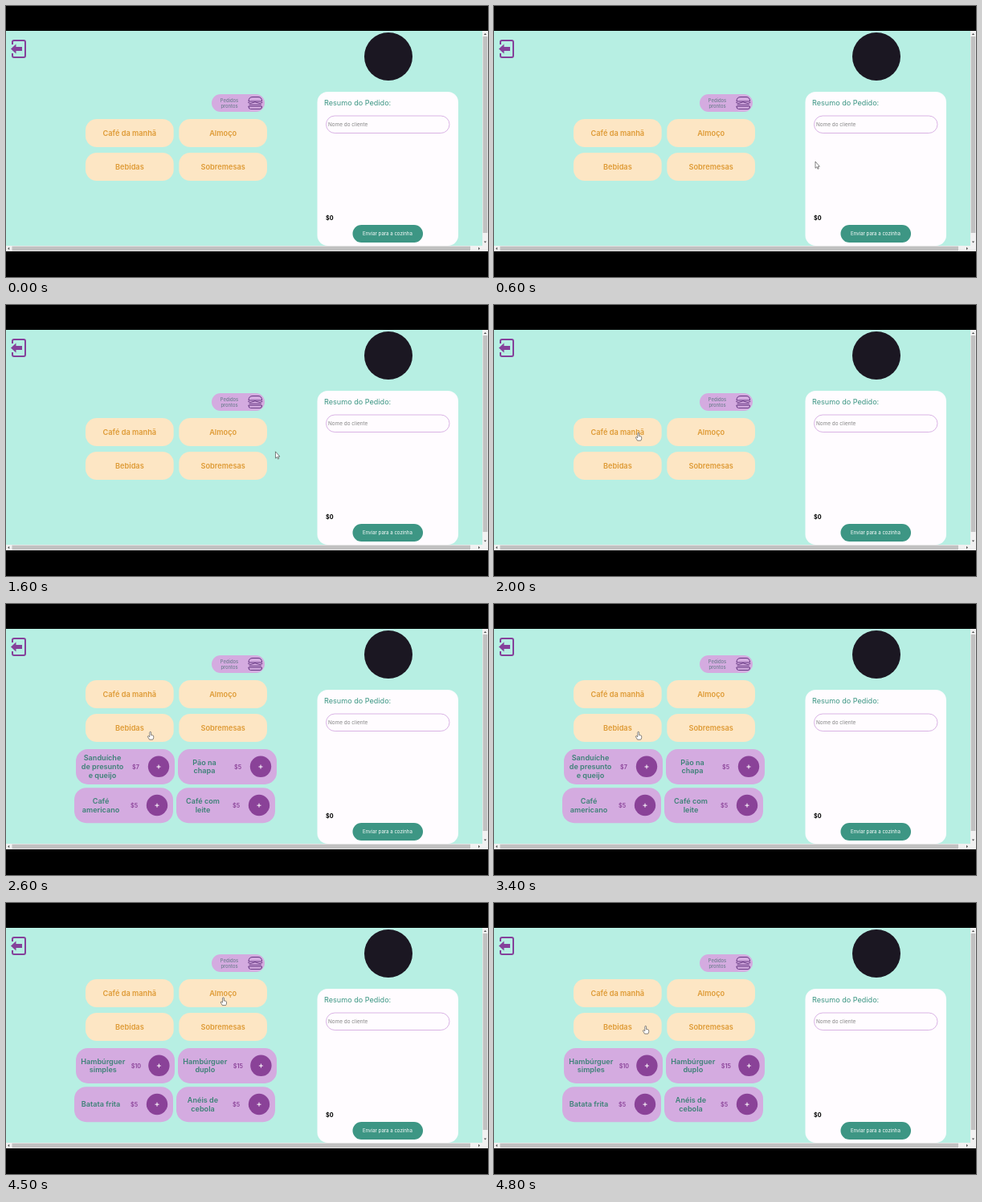
Animation of 600x338 px, one loop 5.1 s. Source, as an HTML page:

```html
<!DOCTYPE html>
<html lang="pt-BR">
<head>
<meta charset="utf-8">
<title>Pedidos</title>
<style>
  html, body { margin: 0; width: 100%; height: 100%; overflow: hidden; background: #000; }
  svg { display: block; width: 100%; height: 100%; font-family: Inter, "Open Sans", sans-serif; }
  .mid { text-anchor: middle; }
  .category { font-size: 9.2px; font-weight: 600; fill: #de9a35; }
  .dish { font-size: 9.1px; font-weight: 600; fill: #3d8277; }
  .price { font-size: 7.2px; font-weight: 600; fill: #8a4298; }
  .ready { font-size: 5.8px; font-weight: 500; fill: #6f7f90; }
  .icon { fill: none; stroke: #5a2a78; stroke-width: .9; stroke-linecap: round; stroke-linejoin: round; }
  .bar { fill: #f1f1f1; }
  .thumb { fill: #c1c1c1; }
  .arrows { fill: #505050; }
</style>
</head>
<body>
<svg viewBox="0 0 600 338">
  <rect width="600" height="338"/>
  <rect y="31" width="593" height="268" fill="#b7efe3"/>

  <!-- Exit icon -->
  <path d="M8 48V45Q8 43 10 43H22Q24 43 24 45V62Q24 64 22 64H10Q8 64 8 62V59" fill="none" stroke="#85409a" stroke-width="2"/>
  <path d="M6 53.5L12.5 47.5V51H20V56H12.5V59.5Z" fill="#85409a"/>

  <circle cx="476" cy="63" r="30" fill="#1b1722"/>

  <!-- Order summary -->
  <rect x="387.5" y="107" width="175.5" height="192" rx="13" fill="#fffcff"/>
  <text x="396" y="124" font-size="9.1" fill="#3d9684">Resumo do Pedido:</text>
  <rect x="398.5" y="137" width="153.5" height="21.5" rx="10.7" fill="#fffcff" stroke="#d5abe1" stroke-width=".9"/>
  <text x="401" y="150.2" font-size="6.4" fill="#858585">Nome do cliente</text>
  <text x="398" y="267" font-size="7.2" font-weight="700">$0</text>
  <rect x="431.5" y="273" width="87.5" height="22" rx="11" fill="#3d9684"/>
  <text class="mid" x="475" y="286.3" font-size="6.1" fill="#fff">Enviar para a cozinha</text>

  <g id="menu">
    <rect x="256" y="110" width="66" height="22" rx="11" fill="#d4abe0"/>
    <text class="ready mid" x="278" y="120.2">Pedidos</text>
    <text class="ready mid" x="278" y="127.2">prontos</text>
    <path class="icon" d="M302 118.5Q302 113.5 307 113.5H314Q318.5 113.5 318.5 118.5ZM301.5 120.5Q304 122.5 307 120.7T313 120.7T319 120.5M303 123.2H317.5M302 125.2H318.5V126Q318.5 128.5 316 128.5H304.5Q302 128.5 302 126Z"/>
    <g id="categories"></g>
  </g>
  <g id="dishes"></g>

  <!-- Scrollbars -->
  <rect class="bar" x="593" y="31" width="7" height="275"/>
  <rect class="bar" y="299" width="600" height="7"/>
  <rect class="thumb" x="593.7" y="38" width="5.6" height="245"/>
  <rect class="thumb" x="7.5" y="299.7" width="570.5" height="5.6"/>
  <path class="arrows" d="M594.8 36L596.5 34L598.2 36ZM594.8 293.5L596.5 295.5L598.2 293.5ZM4.2 300.8L2.2 302.5L4.2 304.2ZM588 300.8L590 302.5L588 304.2Z"/>

  <path id="cursor" stroke="#333" stroke-width=".6" stroke-linejoin="round" fill="#fff"/>
</svg>
<script>
const LOOP = 5100, STEP = 100;
const OPEN_AT = 2600, SWITCH_AT = 4500, MENU_LIFT = 46;
const $ = id => document.getElementById(id);

const categories = [
  ['Café da manhã', 99, 141], ['Almoço', 215.3, 141],
  ['Bebidas', 99, 183], ['Sobremesas', 215.3, 183]
];
const BUTTON_W = 109.7, BUTTON_H = 35;

// Name lines separated by "|", price, optional sideways nudge of the texts
const breakfast = [
  ['Sanduíche|de presunto|e queijo', 7], ['Pão na|chapa', 5],
  ['Café|americano', 5], ['Café com|leite', 5]
];
const lunch = [
  ['Hambúrguer|simples', 10, .8], ['Hambúrguer|duplo', 15, .8],
  ['Batata frita', 5], ['Anéis de|cebola', 5]
];
const slots = [[87, 181], [214, 181], [85, 229.2], [212, 229.2]];

const ARROW = 'M0 0V8.3L1.8 6.7L3 9.3L4.2 8.8L3.1 6.2H5.4Z';
const HAND = 'M-.9 .8A.9 .9 0 0 1 .9 .8V4L3 4.3Q4 4.6 4 5.6V7Q4 8.5 3 9.6H-1.2Q-2 8 -3.3 6Q-3.3 5 -2.2 5.2L-.9 6.2Z';

// Pointer tip: time, x, y
const track = [
  [400, 440, 250], [600, 400, 194], [1300, 400, 194], [1400, 390, 191],
  [2000, 179.7, 159.5], [3400, 179.7, 159.5], [4100, 270, 128.5],
  [4200, 270.5, 118], [4500, 270.5, 118], [4800, 188.7, 153.5]
];

const text = (cls, x, y, s) => `<text class="${cls} mid" x="${x}" y="${y}">${s}</text>`;
const box = (x, y, w, h, r, fill) =>
  `<rect x="${x}" y="${y}" width="${w}" height="${h}" rx="${r}" fill="${fill}"/>`;

function dishCard([name, price, nudge = 0], i) {
  const [x, y] = slots[i], cy = y + 22, lines = name.split('|');
  const label = lines.map((line, n) =>
    text('dish', x + 33 + nudge, cy + 3.1 + (n - (lines.length - 1) / 2) * 10.7, line)).join('');
  const cx = x + 103 + nudge / 2;
  return box(x, y, 123, 44, 15, '#d4abe0') + label +
    text('price', x + 74.5 + nudge / 2, cy + 2.6, '$' + price) +
    `<circle cx="${cx}" cy="${cy - .2}" r="13.2" fill="#8a4298"/>` +
    `<path d="M${cx - 2.5} ${cy}h5m-2.5 -2.5v5" stroke="#fff" stroke-width="1"/>`;
}

function pointerAt(t) {
  const next = track.findIndex(k => k[0] > t);
  if (next === 0) return null;
  if (next < 0) return track[track.length - 1].slice(1);
  const [t0, x0, y0] = track[next - 1], [t1, x1, y1] = track[next];
  const p = (t - t0) / (t1 - t0), e = p * p * (3 - 2 * p);
  return [x0 + (x1 - x0) * e, y0 + (y1 - y0) * e];
}

$('categories').innerHTML = categories.map(([name, x, y]) =>
  box(x, y, BUTTON_W, BUTTON_H, 14, '#fde6c4') +
  text('category', x + BUTTON_W / 2, y + 21, name)).join('');

let shown = null;
function draw(now) {
  const t = Math.floor(now % LOOP / STEP) * STEP;
  const lift = t < OPEN_AT ? 0 : MENU_LIFT;
  const dishes = t < OPEN_AT ? [] : t < SWITCH_AT ? breakfast : lunch;
  $('menu').setAttribute('transform', `translate(0 ${-lift})`);
  if (dishes !== shown) {
    $('dishes').innerHTML = dishes.map(dishCard).join('');
    shown = dishes;
  }

  const tip = pointerAt(t), cursor = $('cursor');
  cursor.style.display = tip ? '' : 'none';
  if (tip) {
    const [px, py] = tip;
    const over = categories.some(([, x, y]) =>
      px > x && px < x + BUTTON_W && py > y - lift && py < y - lift + BUTTON_H);
    cursor.setAttribute('d', over ? HAND : ARROW);
    cursor.setAttribute('transform', `translate(${px} ${py})`);
  }
}

const start = performance.now();
function tick() {
  draw(performance.now() - start);
  requestAnimationFrame(tick);
}
tick();
</script>
</body>
</html>
```
